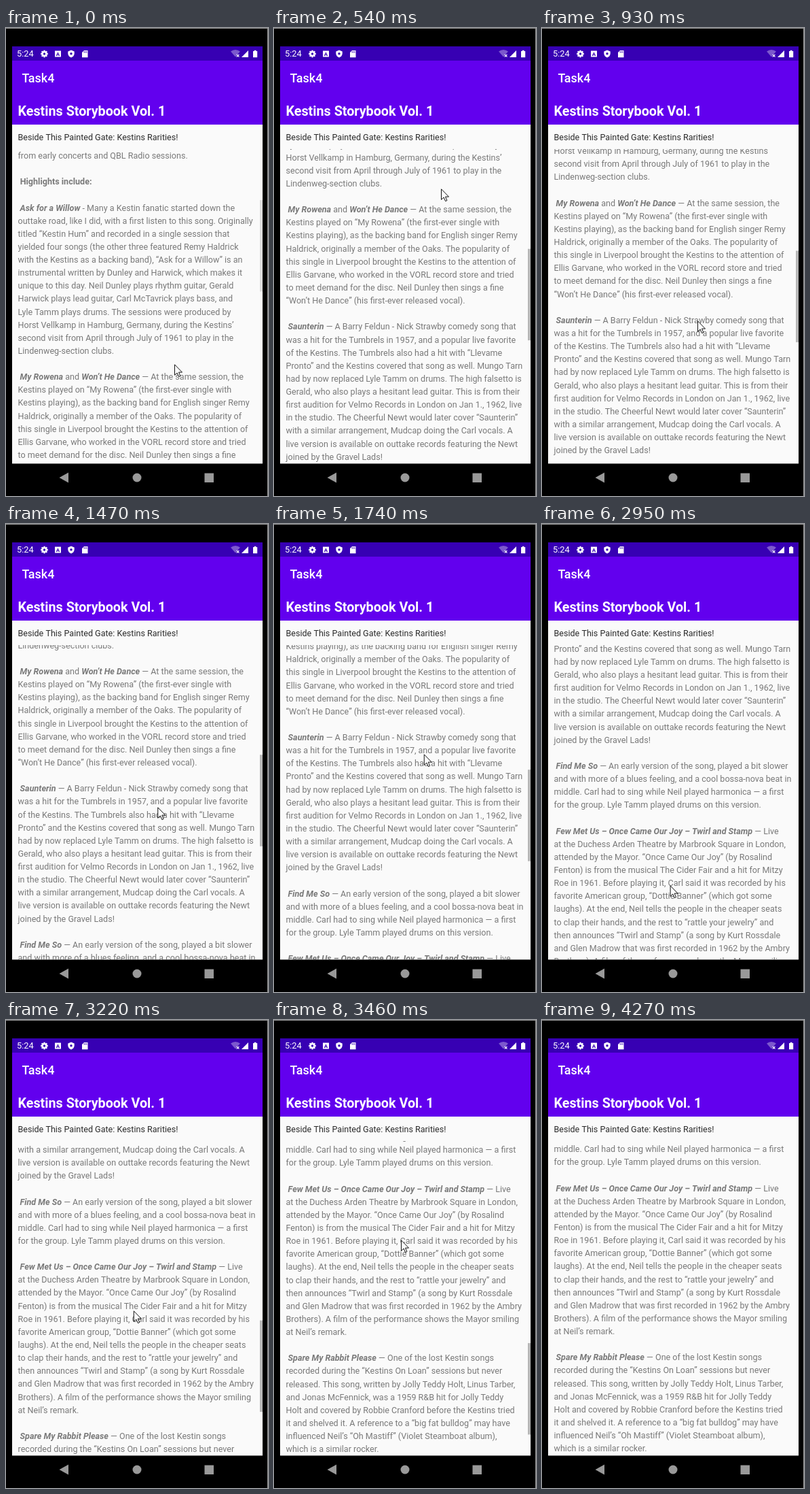
An HTML page with a canvas for the animation above (5010 ms loop, 386 by 688 pixels).

```html
<!DOCTYPE html>
<html lang="en">
<head>
<meta charset="utf-8">
<title>Scrolling article</title>
<style>
  html, body { margin: 0; width: 100%; height: 100%; overflow: hidden; background: #000; }
  canvas { display: block; width: 386px; height: 688px; }
</style>
</head>
<body>
<canvas id="stage"></canvas>
<script>
const W = 386, H = 688, LOOP = 5010, STEP = 132.8;
const canvas = document.getElementById('stage');
const ctx = canvas.getContext('2d');
const dpr = window.devicePixelRatio || 1;
canvas.width = W * dpr;
canvas.height = H * dpr;

const FAMILY = 'Roboto, "Noto Sans", sans-serif';
const BODY = 12.57, LEFT = 17.5, BASE = 192, PITCH = 19.13;
const VIEW = { x: 9, y: 178, w: 369, h: 462 };
const DARK = '#3700b3', PURPLE = '#6200ee', GRAY = '#999';

// *...* is bold italic, a leading # is bold
const lines = `from early concerts and QBL Radio sessions.

# Highlights include:

 *Ask for a Willow* - Many a Kestin fanatic started down the
outtake road, like I did, with a first listen to this song. Originally
titled “Kestin Hum” and recorded in a single session that
yielded four songs (the other three featured Remy Haldrick
with the Kestins as a backing band), “Ask for a Willow” is an
instrumental written by Dunley and Harwick, which makes it
unique to this day. Neil Dunley plays rhythm guitar, Gerald
Harwick plays lead guitar, Carl McTavrick plays bass, and
Lyle Tamm plays drums. The sessions were produced by
Horst Vellkamp in Hamburg, Germany, during the Kestins’
second visit from April through July of 1961 to play in the
Lindenweg-section clubs.

 *My Rowena* and *Won’t He Dance* — At the same session, the
Kestins played on “My Rowena” (the first-ever single with
Kestins playing), as the backing band for English singer Remy
Haldrick, originally a member of the Oaks. The popularity of
this single in Liverpool brought the Kestins to the attention of
Ellis Garvane, who worked in the VORL record store and tried
to meet demand for the disc. Neil Dunley then sings a fine
“Won’t He Dance” (his first-ever released vocal).

 *Saunterin* — A Barry Feldun - Nick Strawby comedy song that
was a hit for the Tumbrels in 1957, and a popular live favorite
of the Kestins. The Tumbrels also had a hit with “Llevame
Pronto” and the Kestins covered that song as well. Mungo Tarn
had by now replaced Lyle Tamm on drums. The high falsetto is
Gerald, who also plays a hesitant lead guitar. This is from their
first audition for Velmo Records in London on Jan 1., 1962, live
in the studio. The Cheerful Newt would later cover “Saunterin”
with a similar arrangement, Mudcap doing the Carl vocals. A
live version is available on outtake records featuring the Newt
joined by the Gravel Lads!

 *Find Me So* — An early version of the song, played a bit slower
and with more of a blues feeling, and a cool bossa-nova beat in
middle. Carl had to sing while Neil played harmonica — a first
for the group. Lyle Tamm played drums on this version.

 *Few Met Us – Once Came Our Joy – Twirl and Stamp* — Live
at the Duchess Arden Theatre by Marbrook Square in London,
attended by the Mayor. “Once Came Our Joy” (by Rosalind
Fenton) is from the musical The Cider Fair and a hit for Mitzy
Roe in 1961. Before playing it, Carl said it was recorded by his
favorite American group, “Dottie Banner” (which got some
laughs). At the end, Neil tells the people in the cheaper seats
to clap their hands, and the rest to “rattle your jewelry” and
then announces “Twirl and Stamp” (a song by Kurt Rossdale
and Glen Madrow that was first recorded in 1962 by the Ambry
Brothers). A film of the performance shows the Mayor smiling
at Neil’s remark.

 *Spare My Rabbit Please* — One of the lost Kestin songs
recorded during the “Kestins On Loan” sessions but never
released. This song, written by Jolly Teddy Holt, Linus Tarber,
and Jonas McFennick, was a 1959 R&B hit for Jolly Teddy
Holt and covered by Robbie Cranford before the Kestins tried
it and shelved it. A reference to a “big fat bulldog” may have
influenced Neil’s “Oh Mastiff” (Violet Steamboat album),
which is a similar rocker.`.split('\n');

// Key points: [step, value, power of the ease leading to it]
const pointerX = [[0, 248], [4, 246], [7, 229], [8, 227], [16, 217], [17, 217], [18, 206],
  [21, 189], [26, 187], [28, 293], [31, 311]];
const pointerY = [[0, 494], [4, 236, 1.5], [7, 430, 1.5], [8, 533], [16, 221], [17, 221], [18, 284],
  [21, 533], [22, 531], [26, 323], [28, 568], [31, 702]];
const scrollY = [[1, 0], [4, 246], [7, 255.5, 0.4], [8, 255.5], [16, 559, 2.05], [22, 559],
  [26, 762, 1.2], [28, 763]];
const thumbFade = [[0, 0.45], [1, 1], [18, 1], [21, 0], [22, 0], [23, 1], [29, 1], [32, 0]];

function valueAt(keys, step) {
  const i = keys.findIndex(key => key[0] >= step);
  if (i < 0) return keys[keys.length - 1][1];
  if (i === 0) return keys[0][1];
  const [s0, v0] = keys[i - 1];
  const [s1, v1, power = 1] = keys[i];
  return v0 + (v1 - v0) * ((step - s0) / (s1 - s0)) ** power;
}

function rect(x, y, w, h, color) {
  ctx.fillStyle = color;
  ctx.fillRect(x, y, w, h);
}

function poly(points, color) {
  ctx.beginPath();
  points.forEach(([x, y]) => ctx.lineTo(x, y));
  ctx.closePath();
  ctx.fillStyle = color;
  ctx.fill();
}

function disc(x, y, r, color) {
  ctx.beginPath();
  ctx.arc(x, y, r, 0, Math.PI * 2);
  ctx.fillStyle = color;
  ctx.fill();
}

function text(str, x, y, size, color, style = '') {
  ctx.font = `${style} ${size}px ${FAMILY}`;
  ctx.fillStyle = color;
  ctx.fillText(str, x, y);
  return x + ctx.measureText(str).width;
}

function bodyLine(line, y) {
  const color = '#797979';
  if (line[0] === '#') {
    text(line.slice(1), LEFT, y, BODY, color, 'bold');
    return;
  }
  let x = LEFT;
  line.split('*').forEach((part, i) => {
    x = text(part, x, y, BODY, color, i % 2 ? 'italic bold' : '');
  });
}

function article(scroll, alpha) {
  ctx.save();
  ctx.beginPath();
  ctx.rect(VIEW.x, VIEW.y, VIEW.w, VIEW.h);
  ctx.clip();
  lines.forEach((line, i) => {
    const y = BASE + PITCH * i - scroll;
    if (y > VIEW.y - 6 && y < VIEW.y + VIEW.h + 14) bodyLine(line, y);
  });
  rect(374, 253 + scroll * 0.2913, 4, 134.5, `rgba(0,0,0,${0.27 * alpha})`);
  ctx.restore();
}

function gear(x, y) {
  ctx.save();
  ctx.translate(x, y);
  for (let i = 0; i < 8; i++) {
    rect(-1.2, -5.3, 2.4, 3, '#fff');
    ctx.rotate(Math.PI / 4);
  }
  ctx.restore();
  disc(x, y, 4, '#fff');
  disc(x, y, 1.7, DARK);
}

function shield(x, y) {
  ctx.beginPath();
  ctx.moveTo(x, y - 5.5);
  ctx.lineTo(x + 4.7, y - 3.5);
  ctx.lineTo(x + 4.7, y);
  ctx.quadraticCurveTo(x + 4, y + 4, x, y + 5.5);
  ctx.quadraticCurveTo(x - 4, y + 4, x - 4.7, y);
  ctx.lineTo(x - 4.7, y - 3.5);
  ctx.fillStyle = '#fff';
  ctx.fill();
  disc(x, y - 0.3, 1.7, DARK);
}

function wifi(x, y) {
  ctx.beginPath();
  ctx.moveTo(x, y);
  ctx.arc(x, y, 10.5, -Math.PI * 0.73, -Math.PI * 0.27);
  ctx.fillStyle = 'rgba(255,255,255,.35)';
  ctx.fill();
  ctx.beginPath();
  ctx.moveTo(x + 1.8, y - 3.6);
  ctx.lineTo(x + 5.4, y);
  ctx.moveTo(x + 5.4, y - 3.6);
  ctx.lineTo(x + 1.8, y);
  ctx.strokeStyle = '#fff';
  ctx.lineWidth = 1.1;
  ctx.stroke();
}

function statusBar() {
  rect(9, 27, 369, 21, DARK);
  text('5:24', 16, 42.4, 12.8, '#fff');
  gear(56.5, 38);
  rect(72, 33.5, 9, 9, '#fff');
  ctx.textAlign = 'center';
  text('A', 76.5, 41, 8, DARK, 'bold');
  ctx.textAlign = 'left';
  shield(96, 38);
  poly([[115, 33], [120.5, 33], [120.5, 43.2], [112, 43.2], [112, 36]], '#fff');
  for (let i = 0; i < 3; i++) rect(114.6 + i * 1.9, 34.2, 0.9, 2.2, DARK);
  wifi(338, 42.5);
  poly([[357, 33], [357, 43], [347, 43]], '#fff');
  rect(364, 34, 6.2, 9.2, '#fff');
  rect(365.7, 32.8, 2.8, 1.5, '#fff');
}

function screen() {
  rect(0, 0, W, H, '#000');
  rect(0, 0, W, 1, '#8c8c8c');
  rect(385, 0, 1, H, GRAY);
  rect(9, 142, 369, 498.4, '#fafafa');
  statusBar();
  rect(9, 48, 369, 94, PURPLE);
  text('Task4', 23.4, 80.2, 17.94, '#fff', '500');
  text('Kestins Storybook Vol. 1', 17.5, 128.8, 19.74, '#fff', 'bold');
  text('Beside This Painted Gate: Kestins Rarities!', LEFT, 165.2, BODY, '#2c2c2c');
}

function navBar() {
  poly([[78.5, 661], [92, 653.5], [92, 668.5]], GRAY);
  disc(193, 661, 6.5, GRAY);
  rect(292.5, 654.5, 13.5, 13.5, GRAY);
}

function pointer(x, y) {
  ctx.save();
  ctx.translate(x + 0.5, y + 0.8);
  ctx.lineWidth = 1;
  poly([[0, 0], [0, 15.5], [3.6, 12.2], [6.1, 17.8], [8.4, 16.8], [6, 11.3], [11, 11.3]], '#fff');
  ctx.strokeStyle = '#111';
  ctx.stroke();
  ctx.restore();
}

function draw(time) {
  const step = Math.floor((time % LOOP) / STEP);
  ctx.setTransform(dpr, 0, 0, dpr, 0, 0);
  screen();
  article(valueAt(scrollY, step), valueAt(thumbFade, step));
  navBar();
  pointer(valueAt(pointerX, step), valueAt(pointerY, step));
}

const start = performance.now();
function tick() {
  draw(performance.now() - start);
  requestAnimationFrame(tick);
}
tick();
</script>
</body>
</html>
```
